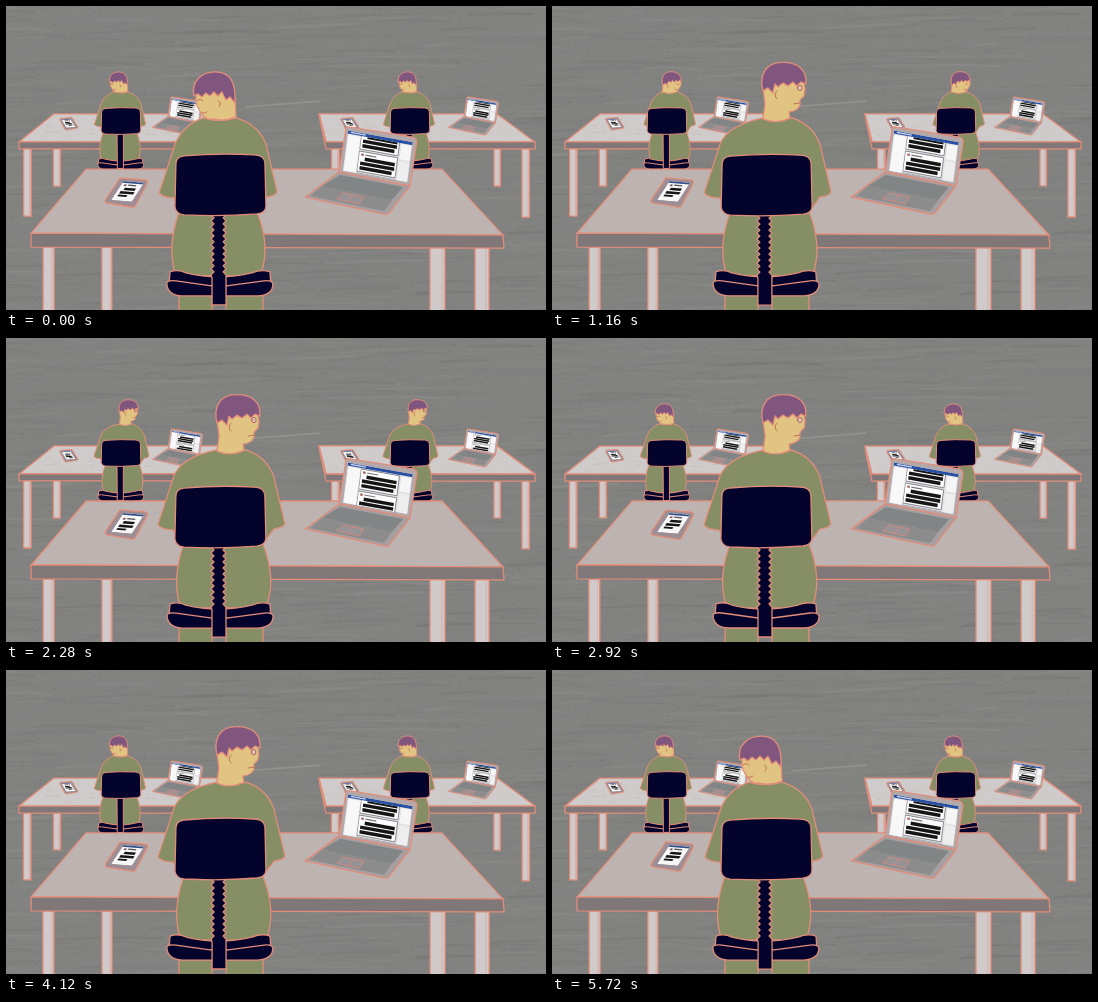
These frames come from a looping animation (540 by 304 pixels, 5800 ms). An HTML page with a canvas:

```html
<!DOCTYPE html>
<html lang="en">
<head>
<meta charset="utf-8">
<title>Desks</title>
<style>
html, body { margin: 0; width: 100%; height: 100%; overflow: hidden; background: #828281; }
canvas { display: block; }
</style>
</head>
<body>
<canvas id="stage" width="540" height="304"></canvas>
<script>
const ctx = document.getElementById('stage').getContext('2d');
const LOOP = 5800, STEP = 80;
const LINE = '#e28d79', NAVY = '#04032c', GREEN = '#868e65', SKIN = '#e2c482',
      HAIR = '#80567f', TOP = '#bdb4b2', PALE = '#cfcbca', EDGE = '#807878', LEG = '#d0caca';

let step = 0, shapeId = 0, zoom = 1;

function rng(seed) {
  return () => {
    seed = (seed * 1664525 + 1013904223) >>> 0;
    return seed / 4294967296;
  };
}

// A filled, outlined path whose position trembles a little at every step.
function shape(d, fill, line = LINE, width = 1.3) {
  const r = rng(++shapeId * 977 + step * 7919);
  r();
  ctx.save();
  ctx.translate((r() - 0.5) * 0.3, (r() - 0.5) * 0.3);
  const p = new Path2D(d);
  if (fill) { ctx.fillStyle = fill; ctx.fill(p); }
  if (line) {
    ctx.strokeStyle = line;
    ctx.lineWidth = width * (zoom < 1 ? 0.75 / zoom : 1);
    ctx.stroke(p);
  }
  ctx.restore();
}

function rect(x, y, w, h, color) {
  ctx.fillStyle = color;
  ctx.fillRect(x, y, w, h);
}

// Draws a part so that its point (x, y) lands on (tx, ty).
function place(part, x, y, tx, ty, sx, sy = Math.abs(sx)) {
  ctx.save();
  ctx.translate(tx, ty);
  ctx.scale(sx, sy);
  ctx.translate(-x, -y);
  zoom = sy;
  part();
  zoom = 1;
  ctx.restore();
}

function paintWall() {
  const c = document.createElement('canvas');
  c.width = 540; c.height = 304;
  const g = c.getContext('2d'), r = rng(41);
  g.fillStyle = '#828281';
  g.fillRect(0, 0, 540, 304);
  g.lineCap = 'round';
  const tones = ['#999997', '#696969', '#8e8a82', '#757879'];
  const brush = (x, y, w, rise, size) => {
    g.lineWidth = size;
    g.beginPath();
    g.moveTo(x, y);
    g.quadraticCurveTo(x + w / 2, y - 3, x + w, y - rise);
    g.stroke();
  };
  for (let i = 0; i < 800; i++) {
    g.globalAlpha = 0.06 + r() * 0.16;
    g.strokeStyle = tones[i % 4];
    brush(r() * 620 - 80, r() * 304, 20 + r() * 110, (r() - 0.3) * 8, 0.5 + r() * 2.4);
  }
  for (let i = 0; i < 2600; i++) {
    g.globalAlpha = 0.12 + r() * 0.25;
    g.fillStyle = ['#a3927b', '#666767', '#9c9c9a'][i % 3];
    g.fillRect(r() * 540, r() * 304, 1 + r() * 2, 0.9);
  }
  g.globalAlpha = 0.5;
  g.strokeStyle = '#a3a3a0';
  brush(240, 101, 74, 6, 1.3);
  return c;
}
const wall = paintWall();

function grain(d, seed, x, y, w, h, n) {
  const r = rng(seed);
  ctx.save();
  ctx.clip(new Path2D(d));
  for (let i = 0; i < n; i++) {
    ctx.globalAlpha = 0.08 + r() * 0.16;
    rect(x + r() * w, y + r() * h, 2 + r() * 7, 0.8, i % 2 ? '#e4e0df' : '#a19a9a');
  }
  ctx.restore();
}

function leg(x, y, w, bottom) {
  shape(`M${x} ${y}V${bottom}H${x + w}V${y}Z`, LEG);
  shape(`M${x + w * 0.8} ${y}V${bottom}`, null, '#d9a59c', 0.7);
}

function backDesks() {
  leg(17.5, 142, 7.5, 210);
  leg(47.5, 142, 7, 180);
  leg(516, 142, 7.5, 211);
  leg(488, 142, 6.5, 180);
  leg(325.5, 142, 7.5, 180);
  const left = 'M48 108H211L221 136H13Z', right = 'M313 108H491L529 136H320Z';
  shape(left, PALE);
  grain(left, 8, 13, 108, 205, 28, 130);
  shape('M13 136H221V143H13Z', EDGE);
  shape(right, PALE);
  grain(right, 9, 313, 108, 216, 28, 130);
  shape('M313 108L320 136H529V143H320L314 115Z', EDGE);
}

function frontDesk() {
  leg(37, 241, 11, 308);
  leg(96, 241, 10, 308);
  leg(424, 241, 15, 308);
  leg(469, 241, 14, 308);
  const top = 'M80 163H436L497 229L25 227Z';
  shape(top, TOP);
  grain(top, 5, 25, 163, 470, 66, 90);
  shape('M25 227L497 229L498 242L25 241Z', EDGE);
}

function post(y, w) {
  rect(0, y, w, 20, '#fdfdfd');
  ctx.strokeStyle = '#85868e';
  ctx.lineWidth = 0.9;
  ctx.strokeRect(0, y, w, 20);
  rect(2, y + 2, 2.5, 2.2, '#a4635f');
  rect(6, y + 2.4, 11, 1.2, '#77777c');
  rect(6, y + 5.5, w - 8, 3.4, '#151515');
  rect(2, y + 10, w - 4, 3.4, '#151515');
  rect(2, y + 14.6, w - 6, 3.4, '#151515');
}

function laptop(scroll) {
  shape('M333 166L340 123Q340 120 344 121L407 131Q411 132 411 136L404 180Z', '#b3a9ab');
  ctx.save();
  ctx.transform(1, 0.18, -0.13, 1, 342, 124.5);
  ctx.beginPath();
  ctx.rect(0, 0, 64.5, 40);
  ctx.clip();
  rect(0, 0, 65, 41, '#e2e1e3');
  rect(1, 4, 12, 37, '#f8f8f8');
  rect(54, 4, 10, 15, '#f6f6f6');
  rect(54, 21, 10, 20, '#efeeef');
  ctx.save();
  ctx.beginPath();
  ctx.rect(13.5, 3, 39.5, 38);
  ctx.clip();
  ctx.translate(14, 0);
  for (let i = -1; i < 3; i++) post((i + scroll) * 22 - 4, 38);
  ctx.restore();
  rect(0, 0, 65, 3, '#2850a2');
  rect(3, 0.8, 15, 1.2, '#cbd6ec');
  ctx.restore();
  shape('M333 166L404 180L383 207Q381 209 378 208L299 191Z', '#a69fa1');
  shape('M334 169L397 181L386 194L316 180Z', '#818585', null);
  shape('M316 180L386 194L378 205L304 190Z', '#8d8c8d', null);
  shape('M337 187L358 191L353 198L331 193ZM347 189L342 196', '#979295', '#d98b81', 0.8);
}

function phone(scroll) {
  shape('M114 172L139 174Q143 175 141 178L130 199Q129 202 125 201L101 197Q98 196 100 193Z', '#9c8e94');
  ctx.save();
  ctx.transform(1, 0.08, -0.65, 1, 117.5, 175);
  ctx.beginPath();
  ctx.rect(0, 0, 20.5, 19);
  ctx.clip();
  rect(0, 0, 21, 19, '#f7f7f8');
  ctx.translate(0, scroll * 4);
  rect(3, 3, 2.5, 1.8, '#8d5a5c');
  rect(7, 3, 8, 1.3, '#55565c');
  rect(5.5, 6.2, 11, 2.4, '#151515');
  rect(3.5, 9.8, 14, 2.4, '#151515');
  rect(3.5, 13.2, 9, 1.8, '#151515');
  ctx.translate(0, -scroll * 4);
  rect(0, 0, 21, 1.8, '#34508c');
  ctx.restore();
}

const heads = {
  left() {
    shape('M190 86L190 98L195 107Q199 114 207 113Q218 116 230 111L229 92L214 82Z', SKIN);
    shape('M188 90C185 75 196 66 209 66C225 66 230 77 229 97L224 91L220 94L216 86L212 90L208 86L204 90L200 87L196 91L192 88Z', HAIR);
    shape('M191 95Q194 92 197 95M196 107Q199 108 201 106M212 95Q216 96 213 101', null, '#b96b51', 0.9);
  },
  right() {
    shape('M204 89L205 101L203 112Q219 118 232 114Q240 112 243 103L247 95L246 84Z', SKIN);
    shape('M204 97C201 76 208 65.5 224 65.5C240 65.5 248 76 247 88L243 85L240 89L236 85L232 90L228 86L223 90L219 87L214 95L210 93Z', HAIR);
    shape('M236 94Q239 97 242 94M232 106Q236 108 239 106M216 96Q213 100 217 103', null, '#b96b51', 0.9);
  },
  up() {
    shape('M211 82L213 98L211 113Q224 119 238 112L237 106Q246 105 248 99L248 94L252 90L253 83L251 73Z', SKIN);
    shape('M211 85C207 69 214 56.5 230 56.5C247 56 255 65 254 78L249 76L245 80L241 76L236 80L231 77L226 81L223 78L221 87L216 82Z', HAIR);
    shape('M245.5 82A2.2 2.6 0 1 0 250 82A2.2 2.6 0 1 0 245.5 82Z', '#dcc9b4', '#b2525f', 0.9);
    shape('M242 98L248 97M225 85Q221 89 225 93', null, '#b96b51', 0.9);
  },
  mid() {
    ctx.save();
    ctx.translate(-15, 3);
    heads.up();
    ctx.restore();
  }
};

// Arm ends, waist edges and neck edges for each pose.
const builds = {
  left: [153, 271, 167, 257, 197, 230],
  right: [161, 280, 174, 266, 203, 238],
  up: [152, 279, 172, 263, 211, 240],
  mid: [153, 270, 168, 260, 196, 226]
};

function body(pose) {
  const [al, ar, wl, wr, nl, nr] = builds[pose];
  shape(`M${nl} 112Q${al + 24} 119 ${al + 16} 138L${al} 187Q${al + 5} 192 ${al + 15} 192` +
    `L${wl + 6} 206Q${wl - 7} 242 ${wl + 3} 270H${wr - 3}Q${wr + 8} 242 ${wr - 6} 206` +
    `L${ar - 11} 191Q${ar - 2} 190 ${ar} 186L${ar - 11} 139Q${ar - 18} 119 ${nr} 112` +
    `Q${(nl + nr) / 2} 117 ${nl} 112Z`, GREEN);
}

function chair() {
  shape('M164 266Q172 263 180 267Q212 275 246 267Q256 263 264 266L265 280H163Z', NAVY);
  shape('M161 277Q162 274 170 275L213 281L258 275Q266 274 267 278Q267 289 252 290H176Q161 289 161 277Z', NAVY);
  let right = '', left = '';
  if (zoom === 1) {
    for (let y = 209, i = 0; y <= 270; y += 3, i++) {
      right += `L${i % 2 ? 217 : 220} ${y}`;
      left = `L${i % 2 ? 208 : 205} ${y}` + left;
    }
  }
  shape(`M206 208${right}L220 ${right ? 272 : 208}V${right ? 299 : 288}H206V272${left}Z`, NAVY);
  shape('M178 150Q213 147 248 149Q258 149 259 157L260 200Q260 207 251 208Q215 211 178 209Q170 208 169 201L170 158Q170 151 178 150Z', NAVY);
}

function person(pose) {
  if (zoom === 1) {
    shape('M173 286V308H206V286Z', GREEN);
    shape('M220 286V308H257V286Z', GREEN);
  }
  body(pose);
  heads[pose]();
  chair();
}

// Each entry: start time, value.
const FRONT = [[0, 'left'], [360, 'right'], [1160, 'up'], [3000, 'right'], [3800, 'up'],
               [4440, 'right'], [4920, 'up'], [5480, 'left']];
const BACK = [[0, 'left'], [360, 'right'], [1960, 'up'], [2920, 'left'], [4200, 'mid'], [5160, 'left']];
const FEED = [[0, 0], [360, 0.36], [1160, 0], [1960, 0.36], [2920, 0]];

function at(track, t) {
  let value;
  for (const [start, v] of track) if (t >= start) value = v;
  return value;
}

function draw(t) {
  step = t < 360 ? Math.min(2, Math.floor(t / STEP)) : Math.floor((t - 40) / STEP);
  shapeId = 0;
  const clock = step < 3 ? step * STEP : step * STEP + 40;
  const scroll = at(FEED, clock), back = at(BACK, clock);
  const screen = () => laptop(scroll), handset = () => phone(scroll);
  ctx.lineJoin = ctx.lineCap = 'round';
  ctx.drawImage(wall, 0, 0);
  backDesks();
  for (const x of [165, 461]) place(screen, 340, 121, x, 91, 0.445, 0.435);
  for (const x of [63, 344]) place(handset, 120, 186, x, 117.5, -0.43);
  for (const x of [115, 404]) place(() => person(back), 214.5, 149, x, 102, 0.435);
  frontDesk();
  screen();
  handset();
  person(at(FRONT, clock));
}

const begin = performance.now();
function tick() {
  draw((performance.now() - begin) % LOOP);
  requestAnimationFrame(tick);
}
tick();
</script>
</body>
</html>
```
